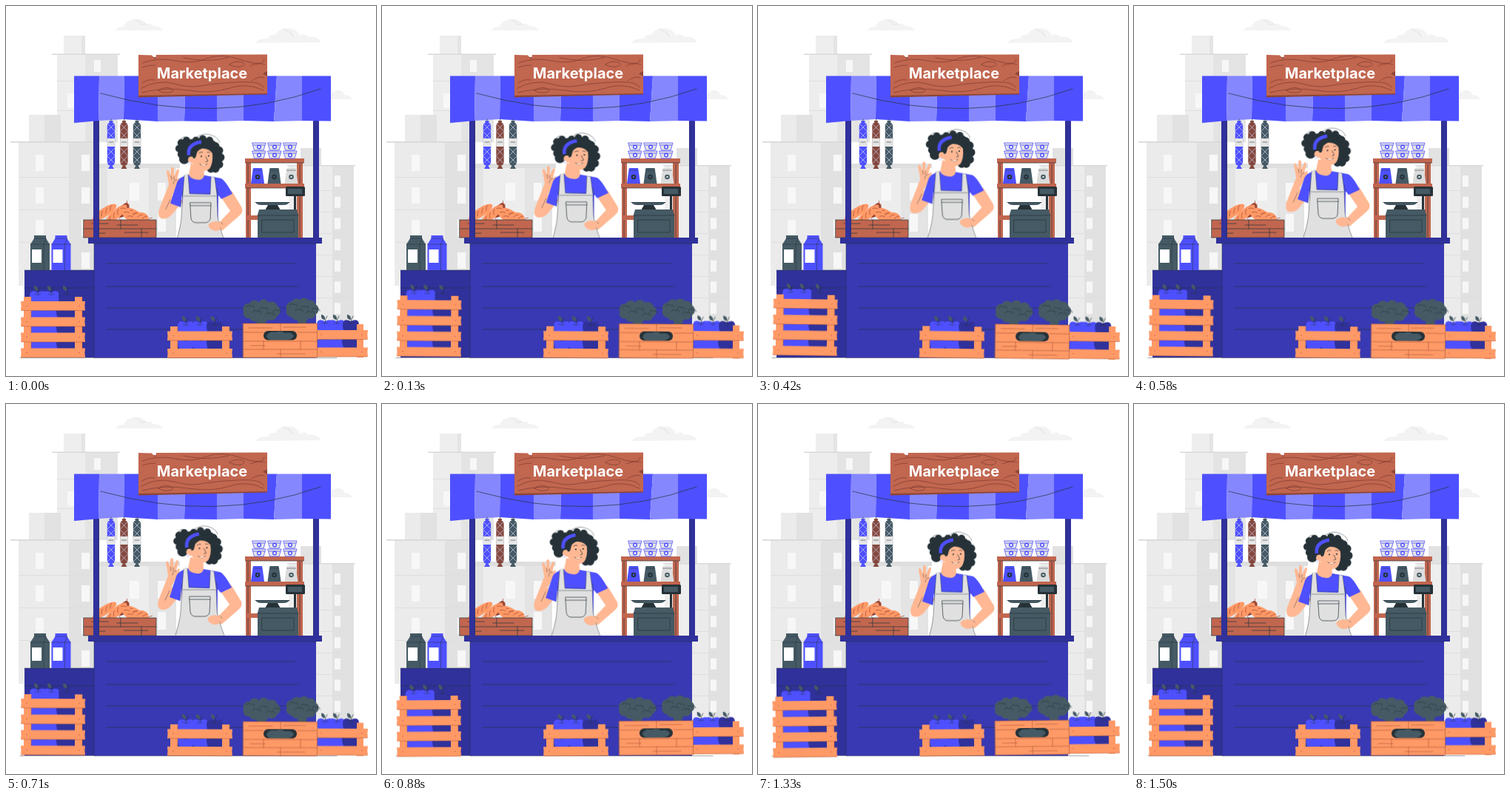
Write an HTML page that moves like this. It is 500x500 px and loops after 1.54 s.

```html
<!DOCTYPE html>
<html lang="en">
<head>
<meta charset="utf-8">
<title>Market stall</title>
<style>
html, body { margin: 0; width: 100%; height: 100%; overflow: hidden; background: #fff; }
svg { display: block; width: 100vw; height: 100vh; }
.ln { fill: none; stroke: #263238; stroke-width: .7; stroke-linecap: round; stroke-linejoin: round; }
.thin { stroke-width: .45; }
.sign { font: 700 20px Inter, Roboto, sans-serif; fill: #fff; text-anchor: middle; }
#body, #arm, #head { animation: rise 770ms cubic-bezier(.37, 0, .63, 1) -105ms infinite alternate; }
#body { --x: -1px; --y: -6px; }
#arm { --x: 0px; --y: -4px; }
#head { --x: -1px; --y: -2.5px; --r: -1.5deg; transform-origin: 262px 226px; }
#crates { transform-origin: 265px 455px; animation: rock 770ms cubic-bezier(.37, 0, .63, 1) -385ms infinite alternate; }
@keyframes rise { from { transform: translate(0, 0) rotate(0deg); } to { transform: translate(var(--x), var(--y)) rotate(var(--r, 0deg)); } }
@keyframes rock { from { transform: rotate(-.82deg); } to { transform: rotate(.82deg); } }
</style>
</head>
<body>
<svg viewBox="0 0 500 500" xmlns="http://www.w3.org/2000/svg">
  <g id="city"></g>

  <g fill="#f3f3f3">
    <path d="M148 33q3-5 11-5 4-10 16-10 11-1 15 7 5-4 9 2 8-1 13 6z"/>
    <path d="M337 50q5-7 17-6 2-6 10-5 5-10 18-9 11 0 15 10 6-4 11 1 13 0 18 8z"/>
    <path d="M428 126q4-5 10-4 3-9 11-8 7 0 8 6 8 0 11 6z"/>
  </g>
  <path d="M174 18q8 3 10 8 2-3 6-1M375 32q10 2 13 9" fill="none" stroke="#e4e4e4" stroke-width="1.2"/>

  <g id="shelf"></g>

  <g id="body">
    <g id="arm">
      <path fill="#ffb893" d="M220 242L207 275Q204 287 212 288Q221 288 227 279L240 263L224 257L233 242Q237 235 235 232L231 235 234 223Q233 219 231 222L227 231 227 220Q225 216 223 220L223 230 220 223Q217 221 217 225L219 235Z"/>
      <path class="ln thin" d="M223 230l1 5M227 231v4M231 235q-5 1-5 6M222 262l-6 13"/>
    </g>
    <path fill="#ffb893" d="M290 258L305 250 319 273Q321 279 315 284L293 303Q282 307 276 301 271 296 274 294L279 291 289 292 303 277Z"/>
    <path class="ln thin" d="M275 296l9 2M277 300l8 1M289 292l4 3"/>
    <path fill="#4e50ff" d="M250 228L268 229 290 233Q296 235 306 254L291 261 287 256 286 325 238 325 238 255 236 272 222 267 231 239Q234 230 250 228Z"/>
    <path class="ln thin" d="M238 256l2-10M287 256l-2-9M236 272l1-9"/>
    <path fill="#ffb893" d="M250 213L267 217 268 229Q266 236 259 235 249 234 247 228Z"/>
    <path fill="#e0e0e0" d="M241 228L246 227 248 254 276 255 277 231 282 232 285 255 286 285Q287 296 300 330L226 330Q236 300 237 286L239 254Z"/>
    <path class="ln thin" d="M241 229l-2 25-2 32q-1 14-7 32M246 228l2 26h28l1-23M282 232l3 23 1 30q1 10 10 34M240 257h44"/>
    <path class="ln" d="M249 266h28l-1 22q-2 5-7 5h-12q-6 0-7-6zM249 270h28"/>
    <path fill="#ffb893" d="M276 293l7-2 8 2-2 10q-8 3-13-2-5-5 0-8z"/>
    <g id="head">
      <g id="hair" fill="#263238"></g>
      <path fill="#ffb893" d="M252 196Q252 185 263 184 275 184 278 194 281 207 277 217 274 224 266 223 257 221 253 213 247 214 246 209 246 203 252 204Z"/>
      <path fill="#263238" d="M253 206Q248 196 253 188 263 179 276 186 283 191 281 203 276 192 265 193 258 195 257 203 256 207 253 206Z"/>
      <path fill="none" stroke="#4e50ff" stroke-width="4.5" d="M247 202Q245 187 264 184"/>
      <path class="ln" d="M261 199q3-2 5-1M272 198q3-1 4 1M270 204l3 6-3 1M262 214q5 4 10 0"/>
      <circle cx="264" cy="203.5" r="1.1" fill="#263238"/><circle cx="274" cy="203" r="1.1" fill="#263238"/>
      <path d="M263 214.5q4 3 8 .2-4 .8-8-.2z" fill="#fff"/>
      <circle cx="248" cy="213" r="2.2" fill="#e8e8ff"/>
      <path class="ln thin" d="M259 177q9-6 19-2 9 3 11 10M233 184q3-6 9-7"/>
    </g>
  </g>

  <g id="bread"></g>
  <g id="stall"></g>
  <g id="awning"></g>
  <g id="goods"></g>
  <path class="ln thin" d="M19 475.6H447"/>
  <g id="crates"></g>
</svg>

<script>
const blue = '#4e50ff', pale = '#8587ff', navy = '#30319b', deep = '#3839b3';
const wood = '#c1664f', peach = '#ff9966', slate = '#455a64', ink = '#263238';

const put = (id, ...parts) => { document.getElementById(id).innerHTML = parts.flat(9).join(''); };
const rect = (x, y, w, h, fill, more = '') => `<rect x="${x}" y="${y}" width="${w}" height="${h}" fill="${fill}" ${more}/>`;
const path = (d, fill) => `<path d="${d}" fill="${fill}"/>`;
const line = (d, more = '') => `<path class="ln" d="${d}" ${more}/>`;
const dot = (x, y, r, fill = '') => `<circle cx="${x}" cy="${y}" r="${r}" ${fill && `fill="${fill}"`}/>`;
const rep = (n, f) => Array.from({ length: n }, (_, i) => f(i));

// Skyline
const panes = (x, y, w, h, n, step) => rep(n, i => rect(x, y + i * step, w, h, '#f7f7f7'));
const floors = (x, y, w, n, step) => rep(n, i => rect(x, y + i * step, w, 1, '#dedede'));
put('city',
  rect(78, 40, 29, 25, '#e4e4e4'), rect(78, 40, 24, 25, '#eeeeee'),
  rect(69, 66, 82, 118, '#ededed'), rect(107, 66, 44, 118, '#e4e4e4'), rect(62, 64.5, 92, 1.5, '#dadada'),
  panes(119, 73, 9, 16, 1, 0), panes(83, 118, 9, 20, 1, 0), floors(69, 101, 55, 2, 40),
  rect(126, 213, 104, 100, '#e4e4e4'), rect(126, 213, 109, 6, '#dedede'),
  rect(137, 219, 56, 94, '#ededed'), panes(167, 239, 13, 24, 2, 42), panes(205, 239, 11, 24, 2, 42),
  rect(31, 147, 43, 37, '#e2e2e2'), rect(31, 147, 21, 37, '#ebebeb'),
  rect(17, 184, 102, 194, '#ebebeb'), rect(85, 184, 34, 194, '#e1e1e1'), rect(6, 183, 113, 1.6, '#d7d7d7'),
  floors(17, 231, 102, 3, 44), panes(40, 201, 11, 22, 4, 44), panes(102, 201, 11, 22, 4, 44),
  rect(398, 192, 28, 24, '#e2e2e2'), rect(382, 215, 37, 98, '#eeeeee'),
  rect(419, 216, 51, 212, '#ebebeb'), rect(441, 216, 29, 212, '#e1e1e1'), rect(380, 215, 92, 1.4, '#d9d9d9'),
  floors(419, 249, 51, 6, 29), panes(444, 229, 8, 15, 7, 28.7));

// Shelf, cups, bags and scale
const cup = (x, y) => [
  path(`M${x - 9} ${y}h18l-3 10h-12z`, '#e4e4e4'),
  dot(x, y + 5.4, 3, blue), dot(x, y + 5.4, 1.5, '#fff'),
  line(`M${x - 9} ${y}h18l-3 10h-12zM${x - 7.5} ${y + 3}h15`, `style="stroke:${blue};stroke-width:.8"`)];
const bag = (x, fill, spot) => [
  path(`M${x - 6} 219h12l1 6 2 15h-18l2-15z`, fill), dot(x, 231, 3.3, spot), dot(x, 231, 1.3, fill),
  line(`M${x - 6} 222h12`, 'style="stroke-width:.5"')];
put('shelf',
  rect(324, 206, 7, 107, wood), rect(393, 206, 8, 107, wood), line('M327 214v26M327 247v65M397 214v26M397 258v54'),
  [206, 240].map(y => [rect(323, y, 80, 6, wood), line(`M324 ${y + 6}h78`)]), rect(324, 283, 16, 6, wood),
  [185, 196].map(y => [342, 363, 384].map(x => cup(x, y))),
  bag(340, blue, ink), bag(362.5, slate, ink), bag(385.5, '#dcdcdc', slate),
  rect(389, 256, 3, 22, ink), rect(378, 244, 26, 13, ink, 'rx="1.5"'), rect(381, 247, 19, 7, slate),
  path('M337 265h46q-2 4-8 4h-30q-6 0-8-4z', slate), path('M354 269h13l4 7h-21z', ink),
  path('M342 275h51l2 7v31h-55v-31z', slate), line('M340 283h55M346 289h43v17h-43zM337 265.5h46'));

// Curly hair as overlapping puffs
const puff = (cx, cy, rx, ry, n, r) => [
  `<ellipse cx="${cx}" cy="${cy}" rx="${rx}" ry="${ry}"/>`,
  rep(n, i => { const a = i * 2 * Math.PI / n; return dot(cx + rx * Math.cos(a), cy + ry * Math.sin(a), r); })];
put('hair', puff(244, 193, 10, 11, 8, 5), puff(266, 187, 13, 7, 8, 5), puff(280, 205, 10, 16, 10, 5.5), dot(241, 207, 7));

// Loaves in a wooden box
const loaf = (x, y, turn, fill, len = 19) => `<g transform="translate(${x} ${y}) rotate(${turn})">` +
  `<ellipse rx="${len}" ry="6" fill="${fill}"/>` +
  rep(4, i => line(`M${i * 7 - 13} 2q2-4 5-5`, 'style="stroke:#a84f38"')).join('') + '</g>';
put('bread',
  loaf(159, 276, -58, '#9c4a38', 11), loaf(133, 279, -33, peach), loaf(149, 281, -40, peach, 18),
  loaf(176, 283, 32, peach, 17), loaf(165, 282, 50, peach, 14), loaf(184, 285, 18, peach, 9),
  rect(105, 289, 98, 24, wood), line('M105 289h98v24h-98zM105 301h98M116 294h22M150 296h28M120 307h14M160 306h32M155 289v12M183 301v12'));

// Counter, side box and posts
put('stall',
  rect(118, 150, 8, 164, navy), rect(415, 150, 8, 164, navy), line('M125.5 157v156M415.5 157v156', 'style="stroke-width:.4"'),
  rect(25, 357, 94, 118, navy), line('M25 381h94M25 357h94', 'style="stroke-width:.5"'),
  rect(119, 320, 300, 155.5, deep), rect(111, 313, 316, 8, navy), line('M119 321.5h300M119 321v154', 'style="stroke-width:.5"'),
  [348, 379, 408, 437].map((y, i) => line(`M136 ${y}h${i % 2 ? 260 : 254}`, 'style="stroke-width:.6"')));

// Awning and sign
const seams = [92, 126, 160, 205, 243, 285, 321, 366, 400, 439];
const hem = [[92, 158], [125, 155], [159, 153], [205, 156], [241, 155.5], [285, 156], [321, 155], [362, 156], [400, 155], [439, 155.5]];
put('awning',
  rep(9, i => path(`M${seams[i]} 94.5H${seams[i + 1]}L${hem[i + 1]}L${hem[i]}z`, i % 2 ? pale : blue)),
  line('M128 118Q285 162 425 112'),
  path('M179 69L353 70V119.5L179 123.5z', '#8d4637'),
  path('M179 66L197 66.5 202 72 203 66 353 65.5V88L347 91.5 353 95V118L179 121z', wood),
  line('M184 77q22-8 45-3t42-3 48 2 30-1M184 83q10-4 18-3M330 81q10-5 20-2M183 111q22-12 44-6t36 3 48-5 37 7M184 117q30-8 62-3t56-3 46 3M206 114q8-6 18-2 4 4-4 5-9 1-14-3zM302 79q7-6 18-3 5 4-3 6-9 1-15-3zM332 101q10-7 17-4M184 104q9-6 17-4M240 70q30 7 60 0', 'style="stroke:#7d3c30"'),
  '<text class="sign" x="265" y="98">Marketplace</text>');

// Hanging sausages and drink cartons
const sausage = (x, fill) => [
  line(`M${x} 153v6`), path(`M${x - 3} 155h6l-2 4h-2z`, fill),
  rect(x - 5.2, 157, 10.4, 59, fill, 'rx="5"'), path(`M${x - 1} 215h2l3 5h-8z`, fill),
  rep(5, i => i === 2 ? '' : line(`M${x - 5} ${159 + i * 11}l10 10m0-10l-10 10`, 'style="stroke:#cfd0ee;stroke-width:.7"')),
  rect(x - 5.2, 179, 10.4, 11, '#e6e6e6'), line(`M${x - 3} 184h6`, 'style="stroke-width:.6"')];
const carton = (x, fill) => [
  path(`M${x + 5} 310h16v4l5 8v35h-26v-35l5-8z`, fill), rect(x + 2, 329, 13, 18, '#fff'),
  line(`M${x + 5} 314h16M${x} 322h26M${x + 18} 322v35M${x + 18} 322l3-8`, 'style="stroke-width:.5"')];
put('goods',
  sausage(142, blue), sausage(159.5, '#84483d'), sausage(177, slate), carton(33, slate), carton(61.5, blue));

// Crates
const apple = (x, y, fill) => [
  path(`M${x} ${y - 8}q11-5 11 5 0 11-8 13h-6q-8-2-8-13 0-10 11-5z`, fill),
  line(`M${x} ${y - 6}q0-5 3-9`), path(`M${x} ${y - 10}q-6 0-5-7 6 1 5 7z`, slate),
  line(`M${x - 4} ${y - 6}q4 3 8 0`, 'style="stroke-width:.5"')];
const apples = (xs, y) => [0, 2, 1].map(i => apple(xs[i], y, i === 1 ? navy : blue));
const slat = (x, y, w) => [
  path(`M${x} ${y}h${w}l-.6 6 .6 6.5h-${w}l.5-6z`, peach),
  line(`M${x + 1} ${y + 12.5}h${w - 2}`, 'style="stroke:#a85637;stroke-width:.5"'),
  [x + 8, x + w - 8].map(n => dot(n, y + 6, .6, '#8f4636'))];
const crate = (x, w, y, slats) => [
  [x + 4, x + w - 14].map(p => rect(p, y, 10, 475 - y, peach) + line(`M${p + 10} ${y + 1}V474`, 'style="stroke:#a85637;stroke-width:.5"')),
  slats.map(s => slat(x, s, w))];
const clump = (x, y, w) => [
  `<g fill="${slate}">`, puff(x, y, w * .32, 8, 9, 7.5), path(`M${x - 9} ${y + 4}h18l-4 16h-10z`, slate), '</g>',
  rep(5, i => line(`M${x - w * .36 + i * w * .16} ${y - 5 + (i * 7) % 11}q3-5 6-1 4-3 5 2`, 'style="stroke-width:.6"'))];

put('crates',
  rect(28, 402, 70, 70, navy), [458, 437, 416].map(y => apples([44, 79, 61], y)), apples([43, 82, 61], 395),
  crate(20, 87, 393, [399, 420.5, 441.5, 462.5]),
  rect(226, 442, 70, 30, navy), apples([243, 282, 263], 457), apples([243, 282, 262], 436),
  crate(218, 88, 433, [439.5, 463]),
  rect(420, 440, 62, 31, navy), apples([430, 465, 448], 455), apples([431, 466, 447], 434),
  rect(474, 430, 9, 45, peach), [438, 461.5].map(y => slat(418, y, 71)),
  clump(345, 412, 57), clump(400, 410, 47),
  rect(320.5, 429, 100, 46, peach),
  rect(348, 439, 45, 12.5, ink, 'rx="6"'), path('M352 446q4-7 12-5 8-3 13 1 9-2 12 4-3 5-9 5h-21q-6 0-7-5z', slate),
  line('M320.5 441h27M394 441h26M320.5 453h100M320.5 464h100M328 435h32M375 434h30M330 459h20M366 470h38M348 453v11M371 429v10M398 453v11M371 464v11M320.5 429h100v46h-100z', 'style="stroke:#a85637;stroke-width:.6"'));
</script>
</body>
</html>
```
